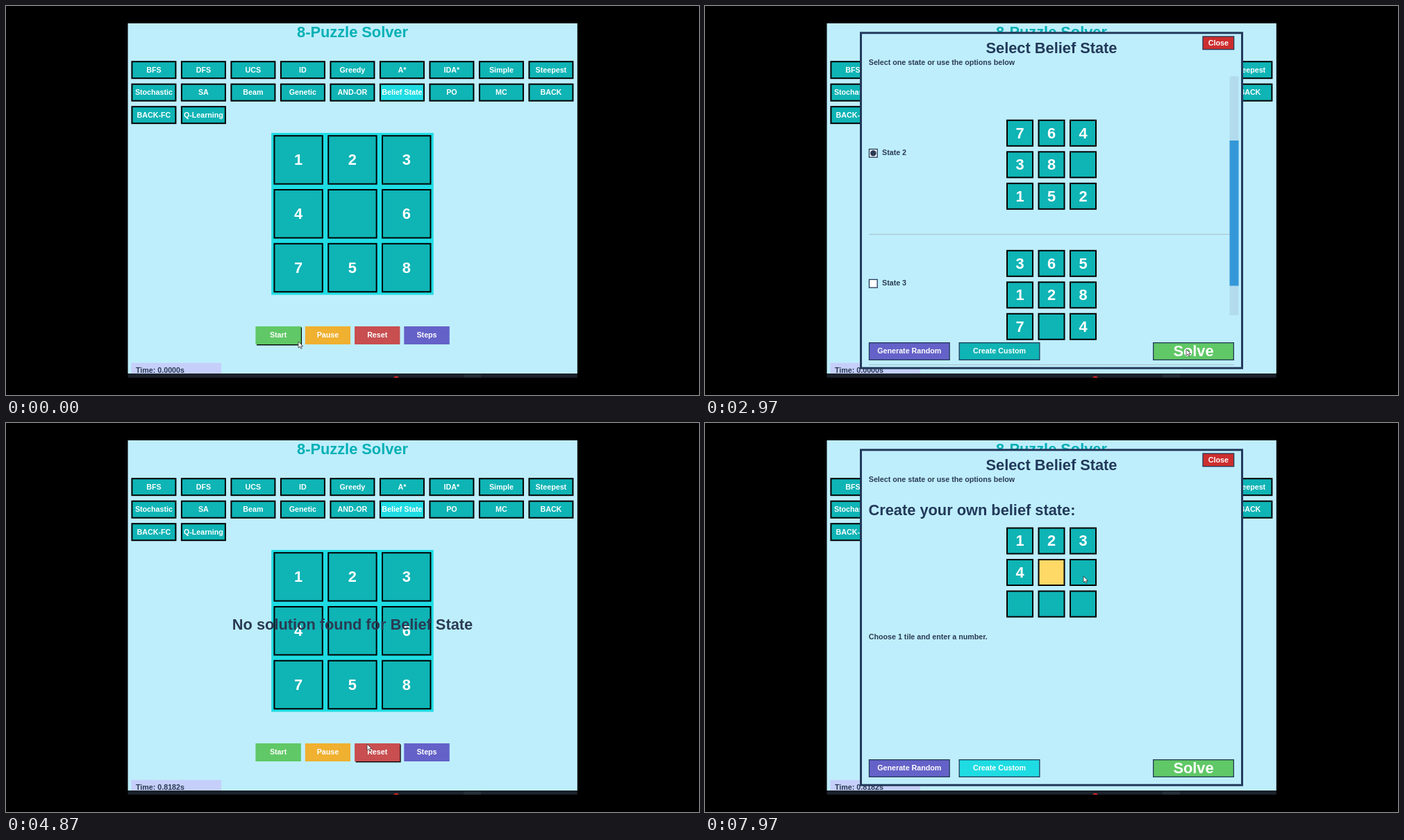
Animation, 998 px wide and 561 px high, one loop 8 s. Source, as an HTML page with a canvas:

```html
<!DOCTYPE html>
<html lang="en">
<head>
<meta charset="utf-8">
<title>8-Puzzle Solver</title>
<style>
  html, body { margin: 0; width: 100%; height: 100%; overflow: hidden; background: #000; }
  canvas { display: block; width: 998px; height: 561px; }
</style>
</head>
<body>
<canvas id="stage" width="998" height="561"></canvas>
<script>
const ctx = document.getElementById('stage').getContext('2d');
const LOOP = 8000, TRAVEL = 240, CLICK_DELAY = 150;
const SMALL = 10.7, LARGE = 21.8, MID = 499;
const SKY = '#beeefc', TEAL = '#0fb4b5', CYAN = '#1fdce3', NAVY = '#22395a', INK = '#2a3a52';
const GREEN = '#60c866', PURPLE = '#6461c8', RED = '#c84e50';

const algorithms = ['BFS', 'DFS', 'UCS', 'ID', 'Greedy', 'A*', 'IDA*', 'Simple', 'Steepest',
  'Stochastic', 'SA', 'Beam', 'Genetic', 'AND-OR', 'Belief State', 'PO', 'MC', 'BACK',
  'BACK-FC', 'Q-Learning'];
const controls = [['Start', GREEN], ['Pause', '#f0b030'], ['Reset', RED], ['Steps', PURPLE]];
const states = ['2835 1476', '76438 152', '3651287 4'];

const controlBox = i => ({ x: 359.6 + i * 71.3, y: 462, w: 65, h: 26 });
const small = { cell: 39, pitch: 45.5, x: 434 };
const tileSpot = i => [
  small.x + i % 3 * small.pitch + 20,
  150.5 + Math.floor(i / 3) * small.pitch + 25
];

// Where the pointer goes, and what its click changes there
const open = { dialog: true, message: false };
const solved = seconds => ({ dialog: false, message: true, chosen: -1, seconds });
const steps = [
  { at: 0, spot: [421, 484], click: open },
  { at: 1400, spot: [267, 342] },
  { at: 2100, spot: [242, 212], click: { chosen: 1 } },
  { at: 2900, spot: [693, 495], click: solved('4.2934') },
  { at: 3500, spot: [545, 479], click: { message: false } },
  { at: 3860, spot: [395, 477], click: open },
  { at: 4180, spot: [242, 166], click: { chosen: 0 } },
  { at: 4540, spot: [693, 495], click: solved('0.8182') },
  { at: 4800, spot: [520, 463], click: { message: false } },
  { at: 5260, spot: [395, 477], click: open },
  { at: 5740, spot: [424, 498], click: { custom: true } },
  { at: 6300, spot: [464, 174] }
];

// Filling the custom board: one tile per beat
const FILL_START = 6460, BEAT = 300;
for (let i = 1; i < 6; i++) steps.push({ at: FILL_START + i * BEAT, spot: tileSpot(i), travel: 120 });

const clamp = (v, lo, hi) => Math.min(hi, Math.max(lo, v));
const countBeats = (t, start, gap, max) => clamp(Math.floor((t - start) / gap) + 1, 0, max);

function stateAt(t) {
  const state = { dialog: false, message: false, custom: false, chosen: -1, seconds: '0.0000' };
  for (const { at, click } of steps) {
    if (t >= at + CLICK_DELAY) Object.assign(state, click);
  }
  return state;
}

function pointerAt(t) {
  return steps.reduce(([x, y], { at, spot, travel = TRAVEL }) => {
    const u = clamp((t - at) / travel + 1, 0, 1), k = u * u * (3 - 2 * u);
    return [x + (spot[0] - x) * k, y + (spot[1] - y) * k];
  }, steps[0].spot);
}

function scrollAt(t) {
  if (t > steps[3].at + CLICK_DELAY) return 0;
  const notch = 32.4;
  return Math.min(208, notch * countBeats(t, 900, 70, 7)) - notch * countBeats(t, 1780, 100, 2);
}

function rect(x, y, w, h, fill) {
  ctx.fillStyle = fill;
  ctx.fillRect(x, y, w, h);
}

function disc(x, y, r, fill) {
  ctx.beginPath();
  ctx.arc(x, y, r, 0, 2 * Math.PI);
  ctx.fillStyle = fill;
  ctx.fill();
}

function box(x, y, w, h, fill, border, line) {
  rect(x, y, w, h, border);
  rect(x + line, y + line, w - 2 * line, h - 2 * line, fill);
}

function text(str, x, middle, size, color, align = 'left') {
  ctx.font = `bold ${size}px "Liberation Sans", Arial, sans-serif`;
  ctx.textAlign = align;
  ctx.fillStyle = color;
  ctx.fillText(str, x, middle + size * 0.35);
}

function button(label, x, y, w, h, fill, border, line, size = SMALL) {
  box(x, y, w, h, fill, border, line);
  text(label, x + w / 2, y + h / 2 - 0.3, size, '#fff', 'center');
}

function grid(digits, x, y, { cell, pitch }, selected = -1) {
  for (let i = 0; i < 9; i++) {
    const fill = i === selected ? '#ffd966' : TEAL;
    button(digits[i] || '', x + i % 3 * pitch, y + Math.floor(i / 3) * pitch,
      cell, cell, fill, '#000', 2, LARGE);
  }
}

function drawMain(state, [px, py]) {
  rect(175.5, 25, 647.3, 505, SKY);
  text('8-Puzzle Solver', MID, 37.2, LARGE, '#00b0b5', 'center');
  algorithms.forEach((name, i) => button(name, 180.4 + i % 9 * 71.5,
    79.2 + Math.floor(i / 9) * 32.5, 65, 26, name === 'Belief State' ? CYAN : TEAL, '#000', 2));

  rect(382.2, 183, 233.5, 233.5, CYAN);
  grid('1234 6758', 385.4, 186.2, { cell: 71.4, pitch: 77.8 });

  controls.forEach(([label, color], i) => {
    const { x, y, w, h } = controlBox(i);
    const hovered = px >= x && px < x + w && py >= y && py < y + h;
    if (hovered) rect(x + 1.4, y + 1.4, w, h, '#000');
    button(label, x, y, w, h, color, color, 0);
  });

  rect(180.4, 514.7, 129.6, 15.3, '#c5cffa');
  text(`Time: ${state.seconds}s`, 187, 525.2, SMALL, INK);
  if (state.message) {
    text('No solution found for Belief State', MID, 290.3, LARGE, INK, 'center');
  }
}

function drawTaskbar() {
  rect(175.5, 530, 647.3, 6, '#1a2129');
  rect(659, 531.5, 25, 4.5, '#252e37');
  disc(562, 539, 5, '#e02828');
  rect(175, 536, 648, 25, '#000');
}

function drawList(chosen, scroll) {
  states.forEach((digits, i) => {
    const y = 119 + i * 188 - scroll;
    if (y < 101 || y > 446) return;
    box(235.8, y + 42, 13, 13, '#fff', NAVY, 1.3);
    if (i === chosen) disc(242.3, y + 48.5, 4.3, INK);
    text(`State ${i + 1}`, 255, y + 47, SMALL, INK);
    grid(digits, small.x, y, small);
    rect(236, y + 165, 526, 1, '#a9bcc6');
  });
  rect(755.5, 101.5, 13, 344.5, '#b3dbee');
  rect(755.5, 101.5 + scroll * 0.646, 13, 209.5, '#3498d8');
}

function drawCustom(t) {
  const selected = countBeats(t, FILL_START + 40, BEAT, 9) - 1;
  const typed = countBeats(t, FILL_START + 330, BEAT, 9);
  text('Create your own belief state:', 235.5, 125.2, LARGE, NAVY);
  grid('123456789'.slice(0, typed), small.x, 150.5, small, selected >= typed ? selected : -1);
  text('Choose 1 tile and enter a number.', 235.8, 308.2, SMALL, INK);
}

function drawDialog(t, { custom, chosen }) {
  box(223, 37.3, 552, 486.4, SKY, NAVY, 3);
  text('Select Belief State', MID, 60.2, LARGE, NAVY, 'center');
  button('Close', 716.3, 43.3, 46, 20, '#cc2e2e', NAVY, 1.3);
  text('Select one state or use the options below', 235.8, 81, SMALL, INK);
  if (custom) drawCustom(t); else drawList(chosen, scrollAt(t));
  const action = (label, x, fill, size) => button(label, x, 485, 117, 26, fill, NAVY, 1.3, size);
  action('Generate Random', 235.8, PURPLE);
  action('Create Custom', 365.5, custom ? CYAN : TEAL);
  action('Solve', 645, custom || chosen >= 0 ? GREEN : '#989898', LARGE);
}

function drawPointer([x, y]) {
  ctx.save();
  ctx.translate(x, y);
  const arrow = new Path2D('M0 0V9L2.2 7 3.7 10.2 5.2 9.5 3.8 6.5H6.6Z');
  ctx.lineWidth = 0.8;
  ctx.strokeStyle = '#333';
  ctx.fillStyle = '#fff';
  ctx.fill(arrow);
  ctx.stroke(arrow);
  ctx.restore();
}

function draw(now) {
  const t = now % LOOP, state = stateAt(t), position = pointerAt(t);
  rect(0, 0, 998, 561, '#000');
  drawMain(state, position);
  drawTaskbar();
  if (state.dialog) drawDialog(t, state);
  drawPointer(position);
  requestAnimationFrame(draw);
}
requestAnimationFrame(draw);
</script>
</body>
</html>
```
